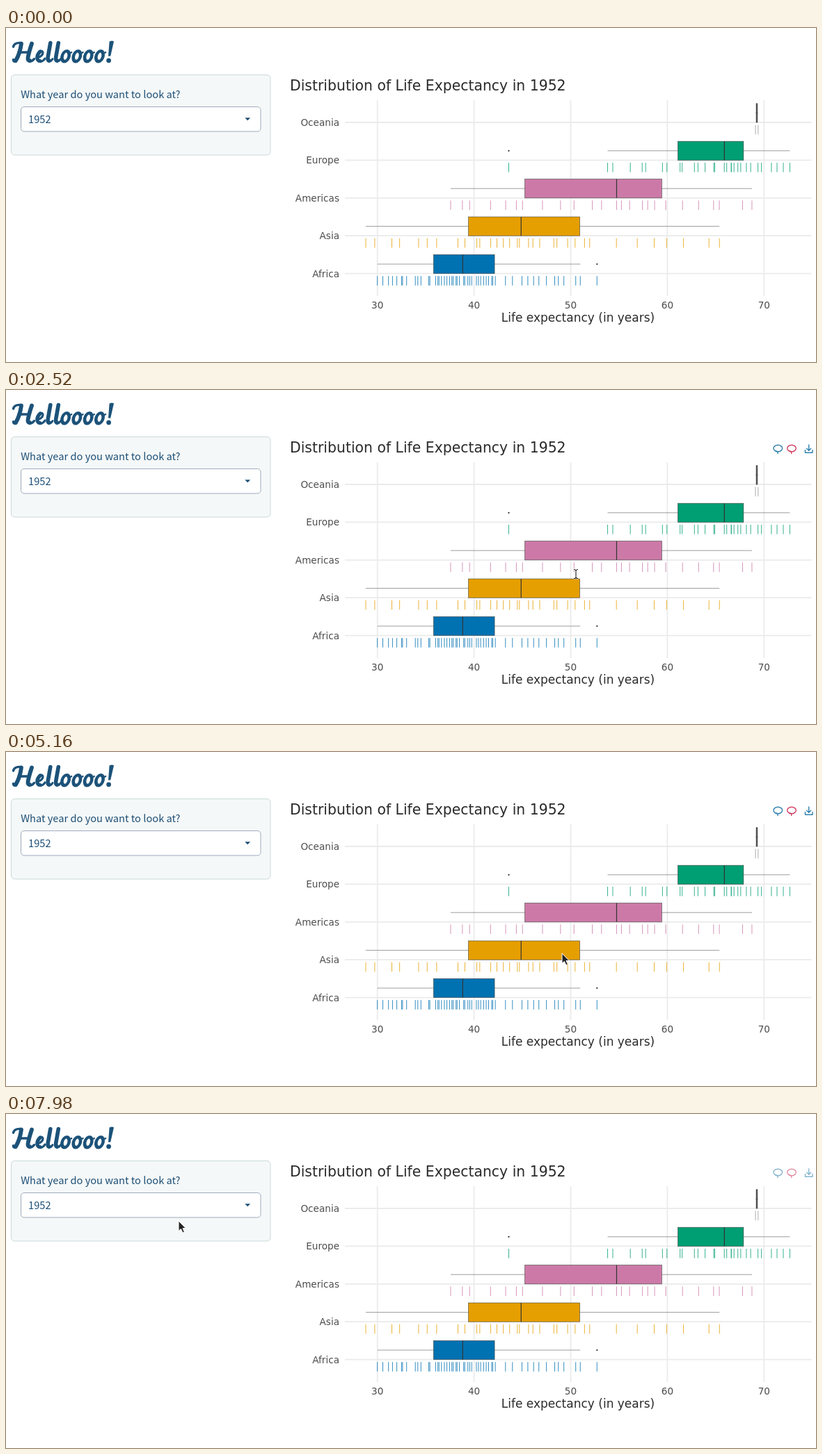
Animation of 1164x481 px, one loop 8 s. Source, as an HTML page:

```html
<!DOCTYPE html>
<html lang="en">
<head>
<meta charset="utf-8">
<title>Life expectancy</title>
<style>
  html, body { margin: 0; width: 100%; height: 100%; overflow: hidden; background: #fff; }
  svg { display: block; position: absolute; left: 0; top: 0; }
  h1 { position: absolute; width: 1px; height: 1px; margin: 0; overflow: hidden; clip-path: inset(50%); }
  .form { font: 14.65px "Noto Sans CJK JP", "Noto Sans CJK SC", "Noto Sans CJK", sans-serif; fill: #1d4f76; }
  .chart { font-family: "DejaVu Sans", sans-serif; fill: #4d4d4d; font-size: 13.6px; }
  .chart .head { fill: #2b2b2b; font-size: 20.4px; }
  .chart .axis { fill: #2b2b2b; font-size: 17px; text-anchor: middle; }
  .ink, .tool { fill: none; stroke-linecap: round; stroke-linejoin: round; }
  .ink { stroke: #1c5279; }
  .tool { stroke-width: 1.4; }
  .grid { stroke: #ebebeb; stroke-width: 1.8; }
  .box { stroke: #333; stroke-width: .7; stroke-opacity: .8; }
  .median { stroke: #333; stroke-width: 1.2; }
  .whisker { stroke: #333; stroke-width: .8; }
</style>
</head>
<body>
<h1>Helloooo!</h1>
<svg width="1164" height="481" viewBox="0 0 1164 481">
  <defs>
    <g id="l">
      <path stroke-width="5.6" d="M8.8 21.5L5.2 42Q4.6 47 7 47"/>
      <path stroke-width="3" d="M7 48.3Q10 48 12 44.5"/>
    </g>
    <g id="o">
      <ellipse cx="8" cy="40.7" rx="5" ry="7.4" stroke-width="4.6" transform="translate(8.2) skewX(-11)"/>
      <path stroke-width="2.2" d="M12 34Q14 37 17 35"/>
    </g>
    <g id="lasso">
      <ellipse cx="0" cy="84" rx="6.3" ry="4.7"/>
      <path d="M-2.7 88Q.3 88.6 -.3 91.5"/>
    </g>
    <path id="bar" d="M-3 -6.5Q0 -6.5 0 -4.5Q0 -6.5 3 -6.5M0 -4.5V4.5M-3 6.5Q0 6.5 0 4.5Q0 6.5 3 6.5"/>
  </defs>

  <g class="ink" aria-hidden="true">
    <path stroke-width="5.8" d="M22 22.5Q20 37 14 47M37 22.5Q32.5 36 31.5 43Q31 47 34 47"/>
    <path stroke-width="3.4" d="M14 48Q10.5 49 10.5 45.5M22 21.5Q12 20.5 10.5 27M18 35H34M34 48.2Q38 48 40.5 44.5"/>
    <path stroke-width="5.2" d="M49 34Q44.6 38 44.8 43Q45.3 47.5 49 47.5"/>
    <path stroke-width="3.2" d="M46.5 42.3Q53 40 53 35.5Q52.5 32.3 49 33.2M49.5 48.4Q53.5 48 56 44"/>
    <use href="#l" x="55"/><use href="#l" x="66.5"/>
    <use href="#o" x="77.3"/><use href="#o" x="93.6"/><use href="#o" x="109.9"/><use href="#o" x="126.2"/>
    <path fill="#1c5279" stroke="none" d="M148.6 19.5Q152 17.6 155 19.2L150.2 40.5H147Z"/>
    <circle cx="147.6" cy="46.8" r="3.4" fill="#1c5279" stroke="none"/>
  </g>

  <rect x="7.5" y="67.5" width="372.5" height="115.5" rx="5" fill="#f5f8f8" stroke="#cbd8d9"/>
  <rect x="21.5" y="113.5" width="344.5" height="35.5" rx="4.5" fill="#fff" stroke="#9dabbd"/>
  <path d="M343.3 129.3H351.1L347.2 133.3Z" fill="#1d4f76"/>
  <g class="form">
    <text x="21.2" y="100.5">What year do you want to look at?</text>
    <text x="32" y="137">1952</text>
  </g>

  <g id="chart" class="chart">
    <text class="head" x="408" y="90">Distribution of Life Expectancy in 1952</text>
    <text class="axis" x="822" y="423">Life expectancy (in years)</text>
  </g>

  <g id="tools" class="tool" opacity="0">
    <use href="#lasso" x="1109.3" stroke="#2f80ad"/>
    <use href="#lasso" x="1129" stroke="#d23c62"/>
    <path stroke="#2f80ad" d="M1153.7 79V87M1150.7 84.3L1153.7 87.3L1156.7 84.3M1148.5 86.5V90.3H1159V86.5"/>
  </g>

  <g id="cursor" opacity="0">
    <path id="arrow" d="M0 0V14.4L3.4 11.5L5.9 17L8.4 15.9L6 10.6H10.3Z" fill="#222" stroke="#fff"/>
    <g id="beam" fill="none" opacity="0">
      <use href="#bar" stroke="#fff" stroke-width="2.6"/>
      <use href="#bar" stroke="#222" stroke-width="1.1"/>
    </g>
  </g>
</svg>

<script>
const LOOP = 8000;
const $ = id => document.getElementById(id);
const chart = $('chart');

// five: whisker start, quartiles, whisker end
const rows = [
  { name: 'Oceania', color: '#999999', count: 2, five: [69.12, 69.19, 69.26, 69.32, 69.39] },
  { name: 'Europe', color: '#009e73', count: 29, five: [53.82, 61.09, 65.9, 67.88, 72.67], outlier: 43.59 },
  { name: 'Americas', color: '#cc79a7', count: 25, five: [37.58, 45.26, 54.75, 59.42, 68.75] },
  { name: 'Asia', color: '#e69f00', count: 33, five: [28.8, 39.42, 44.87, 50.94, 65.39] },
  { name: 'Africa', color: '#0072b2', count: 51, five: [30, 35.81, 38.83, 42.12, 50.99], outlier: 52.72 }
];

const px = v => 533.7 + (v - 30) * 13.89;
const rowY = i => 136 + i * 54.4;

let seed = 1952;
const random = () => (seed = seed * 16807 % 2147483647) / 2147483647;

function add(parent, tag, attrs, text) {
  const el = document.createElementNS('http://www.w3.org/2000/svg', tag);
  for (const k in attrs) el.setAttribute(k, attrs[k]);
  if (text) el.textContent = text;
  return parent.appendChild(el);
}

// Spreads values evenly over the quarters, with some jitter between the two ends.
function spread({ count, five }) {
  return Array.from({ length: count }, (_, i) => {
    const inner = i > 0 && i < count - 1;
    const at = 4 * (i + (inner ? random() - .5 : 0)) / (count - 1);
    const q = Math.min(3, Math.floor(at));
    return five[q] + (at - q) * (five[q + 1] - five[q]);
  });
}

// Frames are [ms, styles, easing]; a frame without easing holds until the next one.
function play(el, frames) {
  el.animate(frames.map(([t, style, easing = 'step-end']) => ({ offset: t / LOOP, easing, ...style })),
    { duration: LOOP, iterations: Infinity });
}

const show = opacity => ({ opacity });
const at = (x, y) => ({ transform: `translate(${x}px, ${y}px)` });

for (let v = 30; v <= 70; v += 10) {
  add(chart, 'path', { class: 'grid', d: `M${px(v)} 104V386` });
  add(chart, 'text', { x: px(v), y: 403.6, 'text-anchor': 'middle' }, String(v));
}
rows.forEach(({ name }, i) => {
  add(chart, 'path', { class: 'grid', d: `M487 ${rowY(i)}H1157.5` });
  add(chart, 'text', { x: 479, y: rowY(i) + 5, 'text-anchor': 'end' }, name);
});

// [from, to, hovered row]
const hovers = [[1780, 2380, 2], [2720, 3660, 2], [3800, 5160, 3], [5860, 7140, 4]];

rows.forEach((row, i) => {
  const y = rowY(i), top = y - 27.2, mid = y - 13.6;
  const [low, q1, q2, q3, high] = row.five.map(px);
  const values = spread(row);
  if (row.outlier) {
    values.push(row.outlier);
    add(chart, 'circle', { cx: px(row.outlier), cy: mid, r: 1.1, fill: '#222' });
  }
  const group = add(chart, 'g', {});
  const whisker = add(group, 'path', { class: 'whisker', d: `M${low} ${mid}H${q1}M${q3} ${mid}H${high}` });
  add(group, 'rect', { class: 'box', x: q1, y: top, width: q3 - q1, height: 27.2, fill: row.color });
  add(group, 'path', { class: 'median', d: `M${q2} ${top}V${y}` });
  const ticks = add(group, 'path', { stroke: row.color, d: values.map(v => `M${px(v)} ${y + 3.6}v13.6`).join('') });

  const track = (el, base, hot, dim = base) => play(el, [
    [0, show(base)],
    ...hovers.flatMap(([from, to, r]) => [[from, show(r === i ? hot : dim)], [to, show(base)]]),
    [LOOP, show(base)]
  ]);
  track(group, 1, 1, .12);
  track(ticks, .8, 1);
  track(whisker, .6, .75);
});

play($('cursor'), [
  [0, show(0)],
  [1140, show(1)],
  [LOOP, show(1)]
]);
play($('cursor'), [
  [0, at(576, 44)],
  [1420, at(576, 44), 'ease-in-out'],
  [1840, at(807, 223), 'ease-in-out'],
  [2520, at(819, 265), 'ease-in-out'],
  [3100, at(820, 239)],
  [3800, at(815, 272)],
  [4080, at(799, 290)],
  [5290, at(729, 322), 'steps(5, start)'],
  [6715, at(684, 337)],
  [7300, at(684, 337), 'ease-in-out'],
  [7980, at(248, 154)],
  [LOOP, at(248, 154)]
]);
play($('arrow'), [[0, show(1)], [2400, show(0)], [2680, show(1)], [LOOP, show(1)]]);
play($('beam'), [[0, show(0)], [2400, show(1)], [2680, show(0)], [LOOP, show(0)]]);
play($('tools'), [
  [0, show(0)], [1480, show(0), 'ease-out'], [1950, show(1)],
  [7750, show(1), 'linear'], [LOOP, show(.55)]
]);
</script>
</body>
</html>
```
